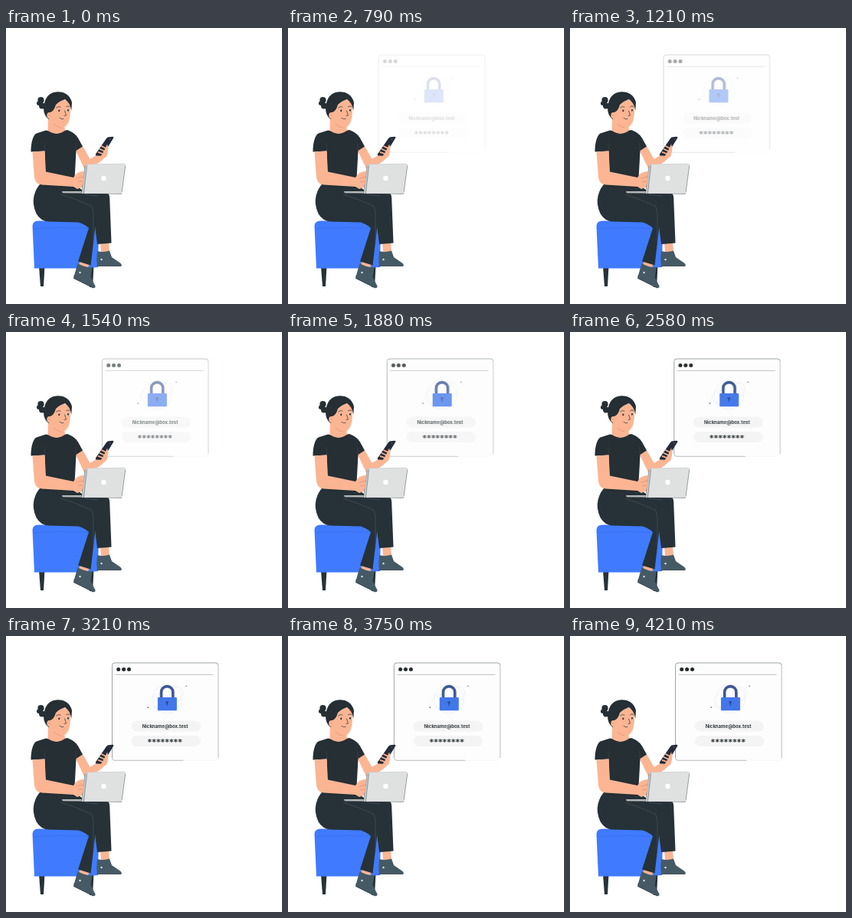
An HTML page for the animation above (4250 ms loop, 360x360 px).

```html
<!DOCTYPE html>
<html lang="en">
<head>
<meta charset="utf-8">
<title>Sign in</title>
<style>
  html, body { margin: 0; width: 100%; height: 100%; overflow: hidden; background: #fff; }
  svg { display: block; width: 100vw; height: 100vh; }
  .skin { fill: #fcb593; }
  .shirt { fill: #252f34; }
  .pants { fill: #263238; }
  .shoe { fill: #455a64; }
  .line { fill: none; stroke: #263238; stroke-width: .7; stroke-linecap: round; stroke-linejoin: round; }
  .fold { fill: none; stroke: #566166; stroke-width: .5; }
  .crease { fill: none; stroke: #d98563; stroke-width: .6; stroke-linecap: round; }
  .mail { font: 700 6px Inter, Arial, sans-serif; fill: #30393d; text-anchor: middle; }
  .pass { font: 700 10px "DejaVu Sans", sans-serif; letter-spacing: .45px; fill: #20282b; text-anchor: middle; }
</style>
</head>
<body>
<svg viewBox="0 0 360 360">
  <!-- login window, drawn from its own left edge -->
  <g id="panel" opacity="0">
    <rect y="35" width="138.5" height="127" rx="3.5" fill="#fdfdfd"/>
    <path d="M0 159V38.5Q0 35 3.5 35H135Q138.5 35 138.5 38.5"
          fill="none" stroke="#7c8385" stroke-width=".75"/>
    <path d="M138.5 38.5V159M93 162.3H3.5Q0 162.3 0 159"
          fill="none" stroke="#a0a5a7" stroke-width=".75"/>
    <path d="M93 162.3H135Q138.5 162.3 138.5 159" fill="none" stroke="#f5f5f5" stroke-width=".7"/>
    <path d="M4 50.4H132" stroke="#a5aaac" stroke-width=".7"/>
    <g fill="#20282b">
      <circle cx="8.2" cy="43.6" r="2.5"/>
      <circle cx="15.1" cy="43.6" r="2.5"/>
      <circle cx="22" cy="43.6" r="2.5"/>
    </g>
    <g fill="none" stroke="#e9ebed" stroke-width=".6">
      <circle cx="71.7" cy="82" r="19"/>
      <circle cx="58.7" cy="85" r="9"/>
      <circle cx="83.7" cy="75" r="9"/>
    </g>
    <circle cx="96.6" cy="65.4" r=".9" fill="#8d969a"/>
    <circle cx="46.8" cy="93.2" r=".9" fill="#6377a5"/>
    <path d="M64.1 82V73.2a7.6 7.6 0 0 1 15.2 0V82" fill="none" stroke="#3d5793" stroke-width="3.6"/>
    <rect x="59.4" y="80" width="25" height="17.2" rx="1.3" fill="#4277ea"/>
    <circle cx="71.7" cy="86.6" r="1.7" fill="#2d4787"/>
    <path d="M71.7 87V91" stroke="#2d4787" stroke-width="1.1"/>
    <rect x="25.5" y="110.5" width="90" height="14" rx="7" fill="#f4f4f4"/>
    <rect x="25.5" y="130" width="90" height="14" rx="7" fill="#f4f4f4"/>
    <text class="mail" x="69" y="119.6">Nickname@box.test</text>
    <text class="pass" x="69" y="142.3">********</text>
  </g>

  <!-- stool -->
  <path d="M43 311H50.5L49 337H45Z M105 300H115L113 338H109Z" fill="#263238"/>
  <path d="M34.5 258Q35 251.5 42 251.5H104L121 262 120 312 97 313.5H37Z" fill="#407bff"/>
  <path d="M36 261.5Q72 259.5 108 261" fill="none" stroke="#376be0" stroke-width=".6"/>

  <!-- far leg -->
  <path class="skin" d="M123 279H134L135 293H124Z"/>
  <path class="shoe" d="M119 291Q127 293 135 290.5L138 299 149 306.5Q152 309 150 310.5H119Q117.5 301 119 291Z"/>
  <path class="line" d="M119 310.5H150"/>
  <circle cx="124.5" cy="302" r="1.2" fill="#dfe5e7"/>
  <path class="pants" d="M92 210L132.5 215.5Q135 216.5 135.2 222L137.5 280.5 119 282 112 226Z"/>

  <!-- near leg -->
  <path class="skin" d="M97 303L109 306 107 313 95 309Z"/>
  <path class="shoe" d="M93.5 307Q102 312 112.5 312.5L110.5 325 116.5 336.5Q117 339.5 113.5 339L89 327Q87 325.5 89.5 321Z"/>
  <path class="line" d="M88.5 326.5L113.5 339"/>
  <circle cx="96.5" cy="319" r="1.2" fill="#dfe5e7"/>
  <path class="pants" d="M45 203L92 205 103 215Q115.5 221 116 235L116.5 258 110.5 309.5 94 304.5 108 261Q103 256 95 253.5L56 252.5Q45 252 39.5 242 34 230 36.5 219 39 209 45 203Z"/>
  <path class="fold" d="M72 217Q96 225 111 232Q113.5 235 114 242L114 280 M103 217L120 219"/>

  <!-- right arm, holding the phone -->
  <path class="skin" d="M90 158L100 154 109.5 171 121 164 124 156Q126 152 132 151.5L133.5 157 131.5 167Q122 176 112 182L102 183Z"/>

  <!-- torso -->
  <path class="shirt" d="M52 133.5Q66 137 80 133Q90 136.5 94 143.5L100 154.5 91.5 160 90 188 89 208Q68 208 46 207Q52 196 51 182L50.5 160.5 32.5 161.5C32.5 150 35 140 39.5 137.5Z"/>
  <path class="skin" d="M55 114H75L77 133.8Q66 142 54.5 133.8Z"/>
  <path class="fold" d="M50.5 160L50 150 M91.5 160L90.5 150" opacity=".6"/>

  <!-- left arm -->
  <path class="skin" d="M34.5 161.5L50.5 160.5 52 187.5 88 195Q92 188 102 187L104 206 93 210 88 207 47 204.5Q38.5 204 37 195Z"/>

  <!-- head -->
  <path class="skin" d="M56 100Q64 90 84 95L84 110Q83.5 124 77 128.7 71 131.5 64 126L55 118Z"/>
  <g class="shirt">
    <circle cx="45.5" cy="94.2" r="4.1"/>
    <circle cx="42.8" cy="98.2" r="2.8"/>
    <circle cx="47" cy="101.5" r="4"/>
    <path d="M49 104Q51 84 67 83.3 82 83 86 97L85.3 108Q83.5 97 77 93 70 95 65 100 62.5 109 57.5 110L56 119Q49 115 49 104Z"/>
  </g>
  <ellipse class="skin" cx="56.5" cy="114" rx="3.2" ry="4"/>
  <path class="line" d="M65.5 104Q68 101.5 71 103 M78.5 102.5Q81 101 83 102.5 M76.5 108L78.5 114 76 114.5 M70 117.3Q72 119.8 75 118.5"/>
  <g fill="#263238">
    <ellipse cx="69.3" cy="107.8" rx="1.1" ry="1.4"/>
    <ellipse cx="81" cy="107.3" rx="1" ry="1.4"/>
  </g>
  <path class="crease" d="M62 125Q66 129 71 130 M55.5 112.5L57.5 115"/>

  <!-- phone and fingers -->
  <path d="M131 144Q132 142.4 134 142.3L139 141.7Q141 141.8 140 143.7L127 165Q126 166.8 124 166.8L118 166.6Q116 166 117.2 164Z" fill="#252b38"/>
  <circle cx="135.5" cy="145" r=".8" fill="#59627b"/>
  <path d="M120.5 162L125 163.7 M122.5 158L128 160.5 M125 154.2L130 156.8"
        stroke="#fcb593" stroke-width="1.8" stroke-linecap="round"/>
  <path class="skin" d="M128.5 159L132 151.5Q134 156 132.5 163L129 168 122 170Z"/>

  <!-- laptop -->
  <path d="M73 213H99L151 214.5V216.5L75 215.5Q73 215 73 213Z" fill="#b9bcbd"/>
  <path class="line" d="M74 215.3L150 216.3" stroke-width=".5" opacity=".6"/>
  <path d="M103 180Q103.5 177.5 106 177.4L153.5 176.8Q156.3 177 155.8 180L151.3 213.5Q150.8 216 148.5 216H98.5Z" fill="#c6c9c9"/>
  <path d="M105.5 180Q106 178 108 178L153.5 177.2Q156 177.4 155.5 180L151 213.5Q150.5 215.8 148.5 215.8H101.5Z" fill="#dfe1e1"/>
  <path class="line" d="M103 180L98.5 215 M105.5 180L101.5 215.5 M155.7 180L151.2 213.5" opacity=".55" stroke-width=".5"/>
  <circle cx="127.5" cy="196" r="3.2" fill="#fff"/>
  <path class="skin" d="M91 191Q96 186.5 102 187.5L100.5 203Q98 208 93 209L89 203Z"/>
  <path class="crease" d="M93 196L101 194 M94 201L100 199.5"/>
</svg>
<script>
  const LOOP = 4250;
  // time in ms, left edge of the window, opacity
  const steps = [
    [0, 114.5, 0],
    [400, 116, .05],
    [790, 118.3, .18],
    [1080, 120.6, .33],
    [1540, 125.4, .6],
    [1850, 128.8, .76],
    [2170, 132.2, .89],
    [2580, 135.7, .98],
    [2900, 137.4, 1],
    [3210, 138.4, 1],
    [3550, 138.6, 1],
    [3900, 138.1, 1],
    [LOOP, 137.4, 1]
  ];
  document.getElementById("panel").animate(
    steps.map(([t, x, opacity]) => ({ offset: t / LOOP, transform: `translate(${x}px, 0)`, opacity })),
    { duration: LOOP, iterations: Infinity }
  );
</script>
</body>
</html>
```
